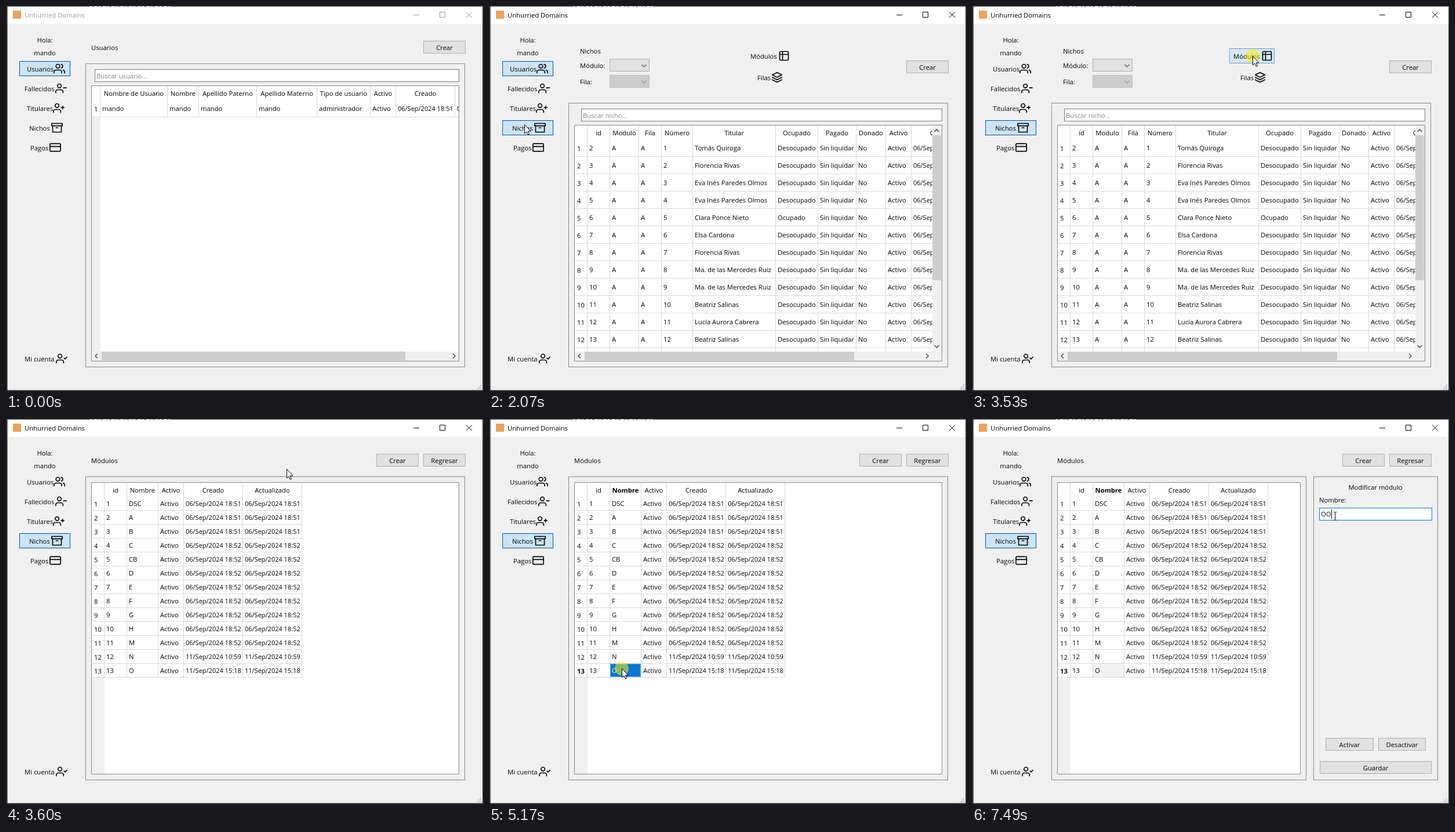
An HTML page for the animation above (8000 ms loop, 823x664 px).

```html
<!DOCTYPE html>
<html lang="es">
<head>
<meta charset="utf-8">
<style>
  html, body { margin: 0; width: 100%; height: 100%; overflow: hidden; background: #f0f0f0; }
  svg { display: block; width: 100vw; height: 100vh; }
  text { font: 11.25px "Open Sans", "Noto Sans", sans-serif; white-space: pre; }
  .date { font-size: 11px; }
  .bold { font-weight: 700; }
</style>
</head>
<body>
<svg id="stage" viewBox="0 0 823 664" xmlns="http://www.w3.org/2000/svg"></svg>
<script>
const LOOP = 8000;
const GRID = '#d8d8d8', FRAME = '#828790', FIELD = '#7a7a7a', FACE = '#f0f0f0';
const USER = 'mando';

// Drawing helpers: boxes are given by their outer pixel edges.
const fill = (x1, y1, x2, y2, color, extra = '') =>
  `<rect x="${x1}" y="${y1}" width="${x2 - x1}" height="${y2 - y1}" fill="${color}" ${extra}/>`;
const box = (x1, y1, x2, y2, color, stroke, extra = '') =>
  fill(x1 + .5, y1 + .5, x2 - .5, y2 - .5, color, `stroke="${stroke}" ${extra}`);
const path = (d, color, width = 1, extra = '') =>
  `<path d="${d}" fill="none" stroke="${color}" stroke-width="${width}" ${extra}/>`;
const hline = (x1, x2, y) => fill(x1, y, x2, y + 1, GRID);
const vline = (x, y1, y2) => fill(x, y1, x + 1, y2, GRID);
const text = (x, y, s, extra = '') => `<text x="${x}" y="${y}" ${extra}>${s}</text>`;
const centered = (x, y, s, extra = '') => text(x, y, s, `text-anchor="middle" ${extra}`);
const group = (id, body) => `<g id="${id}">${body}</g>`;
const button = (x1, y1, x2, label) =>
  box(x1, y1, x2, y1 + 22, '#e1e1e1', '#adadad') + centered((x1 + x2) / 2, y1 + 16, label);
const search = (x, y, label) =>
  box(x, y, 782, y + 22, '#fff', FIELD) + text(x + 3, y + 16, label, 'fill="#808080"');

const PERSON = 'M16 21v-2a4 4 0 0 0-4-4H5a4 4 0 0 0-4 4v2M4.5 7a4 4 0 1 0 8 0a4 4 0 1 0-8 0';
const ICONS = {
  users: 'M17 21v-2a4 4 0 0 0-4-4H5a4 4 0 0 0-4 4v2M5 7a4 4 0 1 0 8 0a4 4 0 1 0-8 0' +
    'M23 21v-2a4 4 0 0 0-3-3.87M16 3.13a4 4 0 0 1 0 7.75',
  minus: PERSON + 'M23 11H17',
  plus: PERSON + 'M20 8V14M23 11H17',
  check: PERSON + 'M17 11l2 2l4-4',
  archive: 'M21 8V21H3V8M1 3H23V8H1ZM10 12H14',
  card: 'M3 4H21a2 2 0 0 1 2 2V18a2 2 0 0 1-2 2H3a2 2 0 0 1-2-2V6a2 2 0 0 1 2-2ZM1 10H23',
  layout: 'M5 3H19a2 2 0 0 1 2 2V19a2 2 0 0 1-2 2H5a2 2 0 0 1-2-2V5a2 2 0 0 1 2-2ZM3 9H21M9 3V21',
  layers: 'M12 2L2 7L12 12L22 7ZM2 17L12 22L22 17M2 12L12 17L22 12'
};
const icon = (name, x, y) => path(ICONS[name], '#000', 2,
  `stroke-linecap="round" stroke-linejoin="round" transform="translate(${x} ${y}) scale(.8333)"`);
const navItem = (label, x, iconName, iconX, middle) =>
  text(x, middle + 5, label) + icon(iconName, iconX, middle - 10);

const TURN = { up: 0, right: 90, down: 180, left: 270 };
const chevron = (x, y, dir, color = '#505050', width = 1.6) =>
  path('M-4 2L0 -2L4 2', color, width, `transform="translate(${x} ${y}) rotate(${TURN[dir]})"`);
const scrollbar = (end, thumbEnd) => fill(148, 596, 781, 612, FACE) +
  fill(165, 596, thumbEnd, 611, '#cdcdcd') + chevron(156, 603.5, 'left') + chevron(end, 603.5, 'right');

// Columns are the x positions of the grid lines; the last one closes the table.
function table({ top, cols, heads, rows, firstLine, rowHeight, bottom, rowBase, headAttr, cellAttr, numAttr }) {
  const lastLine = firstLine + rowHeight * (rows.length - 1);
  let out = fill(148, lastLine + 1, cols[0] + 1, bottom, FACE);
  heads.forEach((h, i) => {
    out += centered((cols[i] + cols[i + 1]) / 2 + .5, top + 17, h, headAttr?.(i));
  });
  cols.forEach(x => out += vline(x, top, lastLine + 1));
  rows.forEach((row, r) => {
    const base = rowBase + r * rowHeight;
    out += hline(148, cols.at(-1) + 1, firstLine + r * rowHeight);
    out += text(152, base + 1, r + 1, numAttr?.(r));
    row.forEach((v, c) => {
      const date = /\/Sep\//.test(v) ? 'class="date"' : '';
      out += text(cols[c] + 4, base, v, date + (cellAttr?.(r, c) ?? ''));
    });
  });
  return out;
}

function usersScene() {
  const rows = [[USER, USER, USER, USER, 'administrador', 'Activo', '06/Sep/2024 18:51', '06/Sep/2024 18:51']];
  return text(147, 76, 'Usuarios') + button(720, 60, 793, 'Crear') +
    box(137, 99, 792, 623, 'none', FRAME) + search(153, 109, 'Buscar usuario...') +
    box(147, 137, 782, 613, '#fff', FRAME) +
    `<g clip-path="url(#usersClip)">` + table({
      top: 138, cols: [162, 278, 332, 432, 536, 628, 672, 774, 876],
      heads: ['Nombre de Usuario', 'Nombre', 'Apellido Paterno', 'Apellido Materno', 'Tipo de usuario', 'Activo', 'Creado', 'Actualizado'],
      rows, firstLine: 191, rowHeight: 30, bottom: 596, rowBase: 181
    }) + '</g>' + scrollbar(773, 689);
}

function nichesScene() {
  const owners = ['Tomás Quiroga', 'Florencia Rivas', 'Eva Inés Paredes Olmos', 'Clara Ponce Nieto',
    'Elsa Cardona', 'Ma. de las Mercedes Ruiz', 'Beatriz Salinas', 'Lucía Aurora Cabrera'];
  const rows = [0, 1, 2, 2, 3, 4, 1, 5, 5, 6, 7, 6].map((o, i) =>
    [i + 2, 'A', 'A', i + 1, owners[o], i === 4 ? 'Ocupado' : 'Desocupado', 'Sin liquidar', 'No', 'Activo', '06/Sep/2024 18:52']);
  const cols = [169, 208, 258, 297, 351, 494, 567, 633, 684, 728, 830];
  return text(157, 82, 'Nichos') + text(157, 107, 'Módulo:') + text(157, 135, 'Fila:') +
    box(208, 91, 277, 113, '#e1e1e1', '#adadad') + chevron(267.5, 103, 'down', '#505050', 1.1) +
    box(208, 119, 277, 141, '#ccc', '#bfbfbf') + chevron(267.5, 131, 'down', '#999', 1.1) +
    group('modulesHover', box(444, 73, 522, 99, '#d8e8f5', '#5f9ccd')) +
    text(451, 91, 'Módulos') + icon('layout', 499, 76) +
    text(463, 128, 'Filas') + icon('layers', 487, 113) +
    button(720, 94, 793, 'Crear') + box(137, 167, 792, 623, 'none', FRAME) +
    search(159, 177, 'Buscar nicho...') + box(147, 205, 782, 613, '#fff', FRAME) +
    `<g clip-path="url(#nichesClip)">` + table({
      top: 206, cols,
      heads: ['id', 'Modulo', 'Fila', 'Número', 'Titular', 'Ocupado', 'Pagado', 'Donado', 'Activo', 'Creado'],
      rows, firstLine: 259, rowHeight: 30, bottom: 590, rowBase: 249
    }) + cols.map(x => vline(x, 590, 596)).join('') + '</g>' +
    scrollbar(756, 630) + fill(765, 206, 781, 596, FACE) + fill(765, 223, 780, 473, '#cdcdcd') +
    chevron(772.5, 215, 'up') + chevron(772.5, 587, 'down');
}

function modulesScene() {
  const names = ['DSC', 'A', 'B', 'C', 'CB', 'D', 'E', 'F', 'G', 'H', 'M', 'N', 'O'];
  const rows = names.map((name, i) => {
    const date = i < 3 ? '06/Sep/2024 18:51' : i < 11 ? '06/Sep/2024 18:52'
      : i < 12 ? '11/Sep/2024 10:59' : '11/Sep/2024 15:18';
    return [i + 1, name, 'Activo', date, date];
  });
  return text(147, 76, 'Módulos') + button(639, 60, 712, 'Crear') + button(720, 60, 793, 'Regresar') +
    box(137, 99, 792, 623, 'none', FRAME, 'id="outer"') + box(147, 109, 782, 613, '#fff', FRAME, 'id="inner"') +
    fill(209, 422, 262, 445, '#fff', 'id="cell"') + table({
      top: 110, cols: [169, 208, 262, 306, 408, 510],
      heads: ['id', 'Nombre', 'Activo', 'Creado', 'Actualizado'],
      rows, firstLine: 157, rowHeight: 24, bottom: 612, rowBase: 150,
      headAttr: i => i === 1 ? 'id="nameHead"' : '',
      numAttr: r => r === 12 ? 'id="rowNumber"' : '',
      cellAttr: (r, c) => r === 12 && c === 1 ? 'id="cellText"' : ''
    }) + box(209, 422, 262, 445, 'none', '#cfe4f6', 'id="cellFocus" stroke-dasharray="1 1"') +
    group('panel', box(589, 99, 804, 623, 'none', FRAME) + centered(696, 122, 'Modificar módulo') +
      text(599, 144, 'Nombre:') + box(599, 153, 794, 175, '#fff', FIELD, 'id="field"') +
      text(602, 168, 'O', 'id="fieldText"') + fill(611, 156, 612, 172, '#000', 'id="caret"') +
      button(610, 550, 693, 'Activar') + button(701, 550, 783, 'Desactivar') + button(600, 590, 793, 'Guardar'));
}

function windowFrame() {
  const grip = [[818, 653], [815, 656], [818, 656], [812, 659], [815, 659], [818, 659]];
  return fill(0, 0, 823, 664, FACE) + fill(0, 0, 823, 31, '#fff') +
    fill(0, 0, 2.5, 664, '#2b2b2b') + fill(0, 0, 823, 1, '#3a3a3a') +
    fill(0, 662.5, 823, 664, '#2b2b2b') + fill(822, 0, 823, 664, '#4a4a4a') +
    path('M145 .5H285', '#bbb', 1, 'stroke-dasharray="3 4 6 2"') +
    fill(12, 8, 26, 22, '#eea25c') +
    group('title', text(32, 20, 'Unhurried Domains', 'fill="currentColor"') +
      path('M703 15.5H713M748.5 10.5H757.5V19.5H748.5ZM794 10.5L804 20M804 10.5L794 20', 'currentColor')) +
    grip.map(([x, y]) => fill(x, y, x + 2, y + 2, '#bfbfbf')).join('');
}

function sidebar() {
  return centered(67, 63, 'Hola:') + centered(67, 85, USER) +
    box(23, 95, 111, 121, '#cce4f7', '#005499', 'id="usersButton"') +
    box(23, 197, 111, 223, '#cce4f7', '#005499', 'id="nichesButton"') +
    navItem('Usuarios', 36, 'users', 82, 108) + navItem('Fallecidos', 32, 'minus', 85, 142) +
    navItem('Titulares', 36, 'plus', 81, 176) + navItem('Nichos', 40, 'archive', 78, 210) +
    navItem('Pagos', 42, 'card', 75, 244) + navItem('Mi cuenta', 32, 'check', 86, 608);
}

document.getElementById('stage').innerHTML =
  `<defs><clipPath id="usersClip">${fill(148, 138, 781, 596, '#000')}</clipPath>` +
  `<clipPath id="nichesClip">${fill(148, 206, 765, 596, '#000')}</clipPath></defs>` +
  windowFrame() + sidebar() + group('users', usersScene()) + group('niches', nichesScene()) +
  group('modules', modulesScene()) +
  group('pointer', '<circle id="click" cy=".5" r="12" fill="#fff000" fill-opacity=".54"/>' +
    '<path id="arrow" d="M.5 .5V16L4 12.8L6.4 18.3L8.6 17.3L6.3 12H11Z" fill="#fff" stroke="#000"/>' +
    path('M-2 -6.5H0M1 -6.5H3M.5 -6V7M-2 7.5H0M1 7.5H3', '#000', 1, 'id="beam"'));

const nodes = Object.fromEntries([...document.querySelectorAll('#stage [id]')].map(n => [n.id, n]));
const show = (id, on) => nodes[id].style.display = on ? '' : 'none';
const set = (id, attr, value) => nodes[id].setAttribute(attr, value);
const within = (t, a, b) => t >= a && t < b;
const clamp = v => Math.max(0, Math.min(1, v));

// Each move: start, end, then points joined by a smooth curve.
const MOVES = [
  [320, 1070, [350, 662], [268, 500], [150, 310], [61, 204]],
  [2610, 3100, [61, 204], [240, 222], [480, 160], [556, 108], [484, 86]],
  [4130, 4830, [484, 86], [420, 190], [300, 350], [229, 430]],
  [5510, 6000, [229, 430], [350, 345], [530, 215], [626, 167]]
];
const CLICKS = [[1530, 1660], [3530, 3600], [5030, 5100], [5170, 5240], [6200, 6340]];
const ease = u => u * u * (3 - 2 * u);
function spline(points, u) {
  const s = u * (points.length - 1), i = Math.min(Math.floor(s), points.length - 2), f = s - i;
  const at = k => points[Math.max(0, Math.min(points.length - 1, k))];
  return [0, 1].map(d => {
    const [a, b, c, e] = [at(i - 1)[d], at(i)[d], at(i + 1)[d], at(i + 2)[d]];
    return b + f / 2 * (c - a + f * (2 * a - 5 * b + 4 * c - e + f * (3 * (b - c) + e - a)));
  });
}
function pointerAt(t) {
  const [start, end, ...points] = MOVES.findLast(m => t >= m[0]) ?? MOVES[0];
  return spline(points, ease(clamp((t - start) / (end - start))));
}

function render(t) {
  show('users', t < 2070);
  show('niches', within(t, 2070, 3600));
  show('modules', t >= 3600);
  nodes.title.style.color = t < 1530 ? '#999' : '#000';

  set('usersButton', 'opacity', clamp(1 - (t - 2070) / 280));
  show('nichesButton', t >= 1530);
  set('nichesButton', 'fill', t < 1600 ? '#e5f1fb' : '#cce4f7');
  set('nichesButton', 'stroke', t < 1600 ? '#0078d7' : '#005499');
  show('modulesHover', t >= 3530);

  const selected = t >= 5030, focused = t >= 6200, panel = t >= 5240;
  set('nameHead', 'class', selected ? 'bold' : '');
  set('rowNumber', 'class', selected ? 'bold' : '');
  set('cell', 'fill', focused ? FACE : selected ? '#0078d7' : '#fff');
  set('cellText', 'fill', selected && !focused ? '#fff' : '#000');
  show('cellFocus', selected && !focused);
  show('panel', panel);
  set('outer', 'width', panel ? 439 : 654);
  set('inner', 'width', panel ? 419 : 634);

  const typed = t >= 7490;
  const [x, y] = pointerAt(t);
  const overField = panel && x >= 599 && within(y, 153, 175);
  set('field', 'stroke', focused ? '#0078d7' : overField ? '#171717' : FIELD);
  nodes.fieldText.textContent = typed ? 'OO' : 'O';
  set('caret', 'x', typed ? 620 : 611);
  show('caret', t >= 6270 && !within(t, 6940, 7420));

  show('pointer', t >= 320);
  set('pointer', 'transform', `translate(${Math.round(x)} ${Math.round(y)})`);
  show('arrow', !overField);
  show('beam', overField);
  show('click', CLICKS.some(([down, up]) => within(t, down, up)));
}

function tick() {
  render(performance.now() % LOOP);
  requestAnimationFrame(tick);
}
tick();
</script>
</body>
</html>
```
